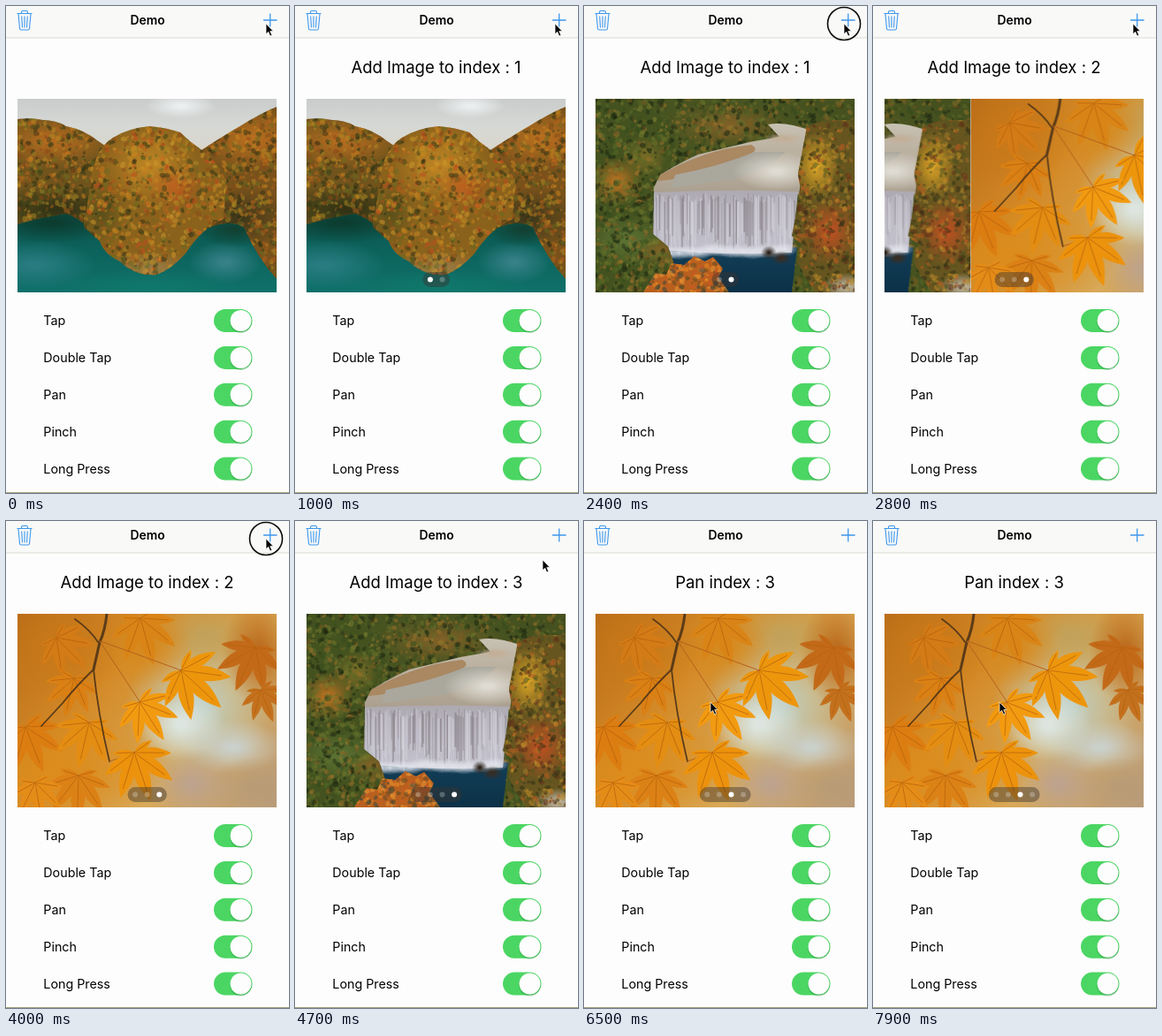
Animation of 320 by 551 pixels, one loop 8000 ms. Source, as an HTML page with a canvas:

```html
<!DOCTYPE html>
<html lang="en">
<head>
<meta charset="utf-8">
<title>Demo</title>
<style>
  html, body { margin: 0; width: 100%; height: 100%; overflow: hidden; background: #fdfdfd; }
  #stage { position: relative; width: 320px; height: 551px; overflow: hidden; }
  #stage > svg { position: absolute; left: 0; top: 0; }
  #view { position: absolute; left: 13px; top: 105px; width: 293px; height: 219px; overflow: hidden; }
  #strip { display: flex; width: max-content; }
  #strip canvas { display: block; flex: none; }
  text { font-family: Inter, Roboto, sans-serif; fill: #000; }
</style>
</head>
<body>
<div id="stage">
  <svg id="chrome" width="320" height="551">
    <rect width="320" height="36" fill="#f9f9f8"/>
    <path d="M0 36H320" stroke="#d2d2c6" stroke-width=".8"/>
    <path d="M0 550.5H320" stroke="#a3a380"/>
    <g fill="none" stroke="#3d97ec" stroke-width="1.1" stroke-linejoin="round">
      <path d="M12.5 8.5H29.5M17.5 8.5V7Q17.5 5.5 19 5.5H23Q24.5 5.5 24.5 7V8.5M14 9L15.5 25.5Q15.7 27 17 27H25Q26.3 27 26.5 25.5L28 9M17.7 11.5L18.5 24.5M21 11.5V24.5M24.3 11.5L23.5 24.5"/>
      <path d="M291 16H306.5M298.7 8.5V23.5" stroke-width="1.3"/>
    </g>
    <text x="160" y="21" text-anchor="middle" font-size="13.9" font-weight="600">Demo</text>
    <text id="label" x="159.5" y="75.7" text-anchor="middle" font-size="18.5"></text>
  </svg>
  <div id="view"><div id="strip"></div></div>
  <svg width="320" height="551">
    <g id="pager"></g>
    <circle id="ring" r="18.5" fill="none" stroke="#0a0a08" stroke-width="1.6"/>
    <path id="cursor" d="M0 0V11.7L2.7 9.3L4.7 14L6.7 13.1L4.7 8.6H8.2Z" fill="#000" stroke="#fff" stroke-width=".7"/>
  </svg>
</div>
<script>
const LOOP = 8000, STEP = 100, W = 293, H = 219;
const $ = id => document.getElementById(id);

function add(parent, tag, attrs, text = '') {
  const el = document.createElementNS('http://www.w3.org/2000/svg', tag);
  for (const k in attrs) el.setAttribute(k, attrs[k]);
  el.textContent = text;
  parent.append(el);
  return el;
}

// Option rows with their switches
['Tap', 'Double Tap', 'Pan', 'Pinch', 'Long Press'].forEach((name, i) => {
  const y = 356 + i * 41.9, svg = $('chrome');
  add(svg, 'text', { x: 42.3, y: y + 5.2, 'font-size': 14.3 }, name);
  add(svg, 'rect', { x: 235, y: y - 13, width: 43.5, height: 26, rx: 13, fill: '#4bd663' });
  add(svg, 'circle', { cx: 265.5, cy: y + 1.5, r: 12.5, fill: '#177a2b', opacity: .28 });
  add(svg, 'circle', { cx: 265.5, cy: y, r: 12, fill: '#fdfdfd' });
});

function random(seed) {
  return () => (seed = seed * 16807 % 2147483647) / 2147483647;
}

function canvas(paint) {
  const c = document.createElement('canvas');
  c.width = W; c.height = H;
  paint(c.getContext('2d'));
  return c;
}

function fade(g, stops, x1 = 0, y1 = H) {
  const f = g.createLinearGradient(0, 0, x1, y1);
  stops.forEach((s, i) => f.addColorStop(i / (stops.length - 1), s));
  return f;
}

function shape(g, path, fill) {
  g.fillStyle = fill;
  g.fill(new Path2D(path));
}

function glow(g, x, y, rx, ry, color, alpha = 1) {
  g.save();
  g.translate(x, y);
  g.scale(rx, ry);
  const f = g.createRadialGradient(0, 0, .1, 0, 0, 1);
  f.addColorStop(0, color);
  f.addColorStop(1, color + '00');
  g.globalAlpha = alpha;
  g.fillStyle = f;
  g.fillRect(-1, -1, 2, 2);
  g.restore();
}

// A wooded mass: base colour, broad glows, then small seeded dabs
function woods(g, path, base, tones, seed, glows = []) {
  const rnd = random(seed);
  g.save();
  g.clip(new Path2D(path));
  g.fillStyle = base;
  g.fillRect(0, 0, W, H);
  glows.forEach(args => glow(g, ...args));
  g.globalAlpha = .5;
  for (let i = 0; i < 2600; i++) {
    const r = 1.2 + rnd() * 2.6;
    g.fillStyle = tones[Math.floor(rnd() * tones.length)];
    g.beginPath();
    g.ellipse(rnd() * W, rnd() * H, r, r * .75, rnd() * 3, 0, 7);
    g.fill();
  }
  g.restore();
}

function lake(g) {
  g.fillStyle = fade(g, ['#c9cccb', '#d6d8d5', '#d9d6cb'], 0, 60);
  g.fillRect(0, 0, W, H);
  glow(g, 185, 8, 40, 14, '#eceff0');
  shape(g, 'M0 120H293V219H0Z', fade(g, ['#0a2f2c', '#0a3b36', '#0b5a54', '#0f716a']));
  glow(g, 20, 188, 70, 28, '#2f8188', .8);
  glow(g, 235, 185, 42, 24, '#3f8791', .8);
  glow(g, 150, 215, 110, 22, '#10786c', .9);
  glow(g, 40, 140, 80, 24, '#0c3a2c', .9);
  glow(g, 245, 148, 45, 20, '#123f30', .9);
  const tones = ['#b5651c', '#b08a24', '#6b6b20', '#3c4218', '#c9841f', '#8b4a18', '#2c2f12'];
  woods(g, 'M0 23Q15 21 29 24Q43 24 55 31Q75 35 90 47L112 62L125 150L92 160Q75 136 55 130Q25 134 0 142Z', '#70541c', tones, 7,
    [[40, 48, 70, 30, '#c4701f', .8], [45, 125, 90, 28, '#2c3014', .9]]);
  woods(g, 'M205 60Q231 43 250 32Q272 18 293 9V204Q271 180 256 145Q240 136 216 146L202 90Z', '#79521b', tones, 23,
    [[265, 45, 60, 36, '#c4741f', .8], [250, 135, 60, 35, '#33331a', .8]]);
  woods(g, 'M75 145L86 76Q92 54 108 44Q125 33 150 31Q170 33 184 38Q195 49 207 57Q225 69 236 92L233 136Q209 146 190 175Q174 193 157 199Q133 201 116 184Q98 176 93 161Z', '#8a621c',
    [...tones, '#c34b1c', '#c68a25', '#d09a2c'], 41,
    [[150, 75, 55, 48, '#c78a25', .8], [178, 100, 32, 25, '#cf5a1f', .6], [150, 192, 60, 20, '#9a7d48', .9], [95, 130, 28, 38, '#4a4a1a', .7]]);
}

function falls(g) {
  const greens = ['#354a1c', '#65702a', '#7f5d22', '#202e14', '#a0732a', '#556827', '#18220f'];
  woods(g, 'M0 0H293V219H0Z', '#475320', greens, 11,
    [[150, 30, 70, 26, '#94662a', .7], [265, 10, 60, 25, '#45501f']]);
  shape(g, 'M195 29Q215 25 243 36L238 59L230 108H66L65 92Q85 77 116 63L174 49L208 43Z', fade(g, ['#d3d1c5', '#bcb2a2', '#a89d8c'], 0, 115));
  shape(g, 'M69 89Q119 58 176 52Q190 59 162 68Q114 90 69 93Z', '#a98862');
  shape(g, 'M90 86Q142 76 180 60L215 60Q196 80 157 91L85 101Z', '#aaa79d');
  glow(g, 205, 82, 50, 22, '#dedbd2');
  glow(g, 213, 45, 24, 7, '#c3ae96');
  shape(g, 'M63 168H228L222 219H95Z', fade(g, ['#2f657c', '#1d4d6c', '#0b3147']));
  shape(g, 'M66 106Q150 102 229 105L222 174Q146 178 65 170Z', fade(g, ['#8f8784', '#a9a4ab', '#c4c3cf'], 0, 175));
  const rnd = random(5);
  for (let x = 67; x < 226; x += 1.5) {
    g.globalAlpha = .15 + rnd() * .3;
    g.fillStyle = rnd() < .4 ? '#6e6468' : '#e6e3ec';
    g.fillRect(x, 107 + rnd() * 12, 1 + rnd(), 30 + rnd() * 34);
  }
  g.globalAlpha = 1;
  for (let x = 70; x < 222; x += 12) glow(g, x, 169 + rnd() * 6, 15, 8, '#e5e6ee', .8);
  glow(g, 196, 174, 9, 8, '#2a2019');
  glow(g, 210, 180, 12, 8, '#3a2c20');
  woods(g, 'M0 0H57L68 14L76 26L84 45L80 58L87 68L74 84L65 102V153L82 167L100 219H0Z', '#43521f',
    [...greens, '#7b7d2f'], 31,
    [[24, 94, 30, 28, '#c17422', .9], [56, 66, 26, 25, '#8d7527', .7], [35, 160, 50, 30, '#5d7434', .9], [75, 172, 30, 18, '#8e6426', .8]]);
  woods(g, 'M54 219L68 197L80 199L86 186L100 188L112 178L124 184L133 179L144 192L139 202L151 219Z', '#b9601f',
    ['#ed8b22', '#d45420', '#eb9c38', '#5c4a22', '#2c4640'], 17);
  woods(g, 'M239 31L259 24H293V219H249L238 203L228 184L233 165L222 155L232 103L229 85Z', '#66551f',
    ['#a4802a', '#bd5d22', '#4b5220', '#c48d28', '#5e2f18', '#2b2d15'], 19,
    [[250, 76, 26, 39, '#e0a826', .9], [265, 150, 32, 38, '#c84f21', .85], [284, 213, 28, 16, '#bdb4a0']]);
}

// Seven-lobed leaf pointing along the given angle
function leaf(g, x, y, r, turn, color) {
  const lobes = [.42, .72, .92, 1, .92, .72, .42];
  g.save();
  g.translate(x, y);
  g.rotate(turn);
  g.lineWidth = .7;
  g.strokeStyle = '#b5610d';
  lobes.forEach((k, i) => {
    const len = r * k, w = len * .17;
    g.save();
    g.rotate((i - 3) * .62);
    shape(g, `M0 0C${len * .3} ${-w} ${len * .55} ${-w * 1.3} ${len} 0C${len * .55} ${w * 1.3} ${len * .3} ${w} 0 0Z`, color);
    g.stroke(new Path2D(`M0 0H${len * .8}`));
    g.restore();
  });
  g.restore();
}

function maple(g) {
  g.fillStyle = fade(g, ['#b96c19', '#d48a27', '#d8a958', '#b99c7c'], W, H);
  g.fillRect(0, 0, W, H);
  glow(g, 205, 105, 82, 82, '#bdcdc2');
  glow(g, 185, 125, 50, 42, '#dce5df');
  glow(g, 213, 25, 60, 40, '#bda461', .8);
  glow(g, 244, 151, 57, 31, '#cad3d2', .9);
  glow(g, 197, 192, 54, 40, '#b9a398', .8);
  glow(g, 270, 196, 55, 35, '#b79b77', .8);
  glow(g, 273, 42, 42, 61, '#b86618', .9);
  glow(g, 144, 37, 53, 47, '#d6891b', .85);
  glow(g, 49, 40, 72, 62, '#c97816', .8);
  glow(g, 45, 177, 120, 62, '#dd8c19', .85);
  leaf(g, 269, 38, 54, 2, '#c36a19');
  leaf(g, 275, 86, 39, 1.2, '#c4711e');
  leaf(g, 44, 27, 48, .8, '#d37b16');
  leaf(g, 139, 5, 55, 1.3, '#d98416');
  leaf(g, 64, 73, 45, 1.8, '#da8014');
  leaf(g, 9, 128, 55, 1.2, '#dc7d11');
  leaf(g, 81, 123, 53, 1.8, '#e38d12');
  leaf(g, 69, 183, 53, 1.6, '#dc8115');
  leaf(g, 20, 191, 44, 1.4, '#e58c18');
  g.strokeStyle = '#5b3b18';
  g.lineCap = 'round';
  g.lineWidth = 3;
  g.stroke(new Path2D('M101 0Q99 19 93 32L86 63'));
  g.lineWidth = 1.8;
  g.stroke(new Path2D('M86 63Q68 80 51 101L27 127M91 32Q82 18 65 6M86 63Q91 113 104 167'));
  g.lineWidth = 1;
  g.strokeStyle = '#b5611c';
  g.stroke(new Path2D('M94 31Q144 49 185 64M93 31Q117 67 138 99M104 167L132 157'));
  leaf(g, 185, 64, 62, .75, '#ed960c');
  leaf(g, 138, 100, 51, 1, '#f29a10');
  leaf(g, 132, 157, 58, 1.25, '#ec920c');
}

$('strip').append(canvas(lake), canvas(falls), canvas(maple), canvas(falls));

const pages = [[0, 0], [1000, 0], [1300, 1], [2600, 1], [2900, 2], [4200, 2], [4500, 3],
  [5400, 3], [5500, 2.7], [5600, 2.13], [5800, 2]];
const pointer = [[0, 294, 20], [4500, 294, 20], [4700, 280, 44], [5200, 145, 204],
  [5400, 145, 204], [5600, 231, 199], [5900, 231, 199], [6300, 143, 205]];
const presses = [[700, 1000], [2300, 2600], [3900, 4200], [5400, 5600]];
const labels = [[0, ''], [1000, 'Add Image to index : 1'], [2600, 'Add Image to index : 2'],
  [4200, 'Add Image to index : 3'], [5500, 'Pan index : 3']];
const counts = [[0, 1], [1000, 2], [2600, 3], [4200, 4]];

const latest = (table, t) => table.findLast(row => row[0] <= t);

function track(table, t, col = 1) {
  const a = latest(table, t), b = table[table.indexOf(a) + 1];
  return b ? a[col] + (b[col] - a[col]) * (t - a[0]) / (b[0] - a[0]) : a[col];
}

function drawPager(count, active) {
  const box = $('pager'), gap = 13.6, left = 159.7 - (count - 1) * gap / 2;
  box.replaceChildren();
  if (count < 2) return;
  add(box, 'rect', { x: left - 8.5, y: 301, width: (count - 1) * gap + 17, height: 17, rx: 8.5, fill: '#3a3430', opacity: .45 });
  for (let i = 0; i < count; i++) {
    add(box, 'circle', { cx: left + i * gap, cy: 309.5, r: 3, fill: '#fff', opacity: i === active ? 1 : .25 });
  }
}

function render(t) {
  const page = track(pages, t), x = track(pointer, t), y = track(pointer, t, 2);
  $('strip').style.transform = `translateX(${-page * W}px)`;
  $('label').textContent = latest(labels, t)[1];
  drawPager(latest(counts, t)[1], Math.round(page));
  $('cursor').setAttribute('transform', `translate(${x} ${y})`);
  $('ring').setAttribute('transform', `translate(${x} ${y})`);
  $('ring').style.display = presses.some(([a, b]) => t >= a && t < b) ? '' : 'none';
}

const start = performance.now();
function tick() {
  const t = (performance.now() - start) % LOOP;
  render(Math.floor(t / STEP) * STEP);
  requestAnimationFrame(tick);
}
tick();
</script>
</body>
</html>
```
